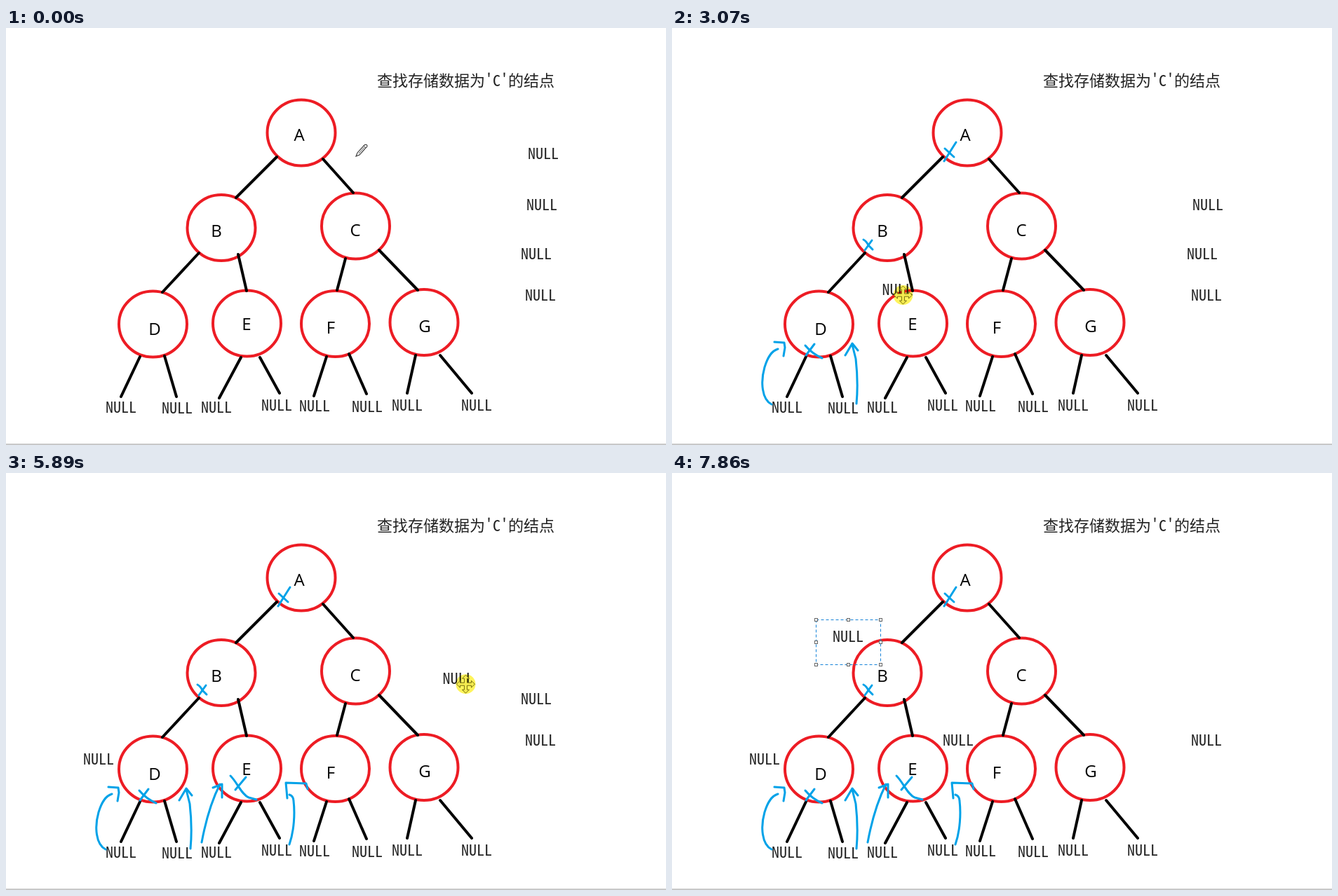
These frames come from a looping animation (941x595 px, 8 s). An HTML page:

```html
<!DOCTYPE html>
<html lang="zh">
<head>
<meta charset="utf-8">
<title>Tree search</title>
<style>
  html, body { margin: 0; width: 100%; height: 100%; overflow: hidden; background: #fff; }
  svg { display: block; width: 941px; height: 595px; }
  .cjk { font: 22px "Noto Sans Mono CJK SC", "Noto Sans Mono CJK JP", "Noto Sans CJK SC", "Noto Sans CJK", monospace; fill: #222; font-weight: 300; }
  .key { font: 24px "Open Sans", "Noto Sans", sans-serif; text-anchor: middle; }
  .node { fill: none; stroke: #ed1c24; stroke-width: 4; }
  .edge { stroke: #000; stroke-width: 4; stroke-linecap: round; }
  .ink { fill: none; stroke: #00a2e8; stroke-width: 3; stroke-linecap: round; stroke-linejoin: round; }
  .box { fill: none; stroke-width: 1; }
  .grip { fill: #fff; stroke: #666; }
</style>
</head>
<body>
<svg id="stage" viewBox="0 0 941 595">
  <rect y="593" width="941" height="2" fill="#c8c8c8"/>
  <text class="cjk" x="529" y="83">查找存储数据为'C'的结点</text>
  <g id="tree"></g>
  <g id="inks"></g>
  <g id="boxes"></g>
  <g id="pencil">
    <path d="M0 0L2-5L12-16Q15-18 16-15Q16-13 14-12L5-2Z" fill="#fff" stroke="#333" stroke-width="1.1"/>
    <path d="M4-4L13-14M11-15L14-12M0 0L2-1" fill="none" stroke="#555"/>
  </g>
  <g id="cursor">
    <circle r="14" fill="#fff45c" style="mix-blend-mode:multiply"/>
    <g id="cross" fill="none" stroke="#77743a"><circle r="4.5"/><path d="M-12 0H-2M2 0H12M0-12V-2M0 2V12"/></g>
    <path id="move" fill="#f5ec50" stroke="#77700f" d="M0-13L5-8H2V-2H8V-5L13 0L8 5V2H2V8H5L0 13L-5 8H-2V2H-8V5L-13 0L-8-5V-2H-2V-8H-5Z"/>
  </g>
</svg>
<script>
const LOOP = 8000;
const $ = id => document.getElementById(id);

function add(parent, tag, attrs, text) {
  const el = document.createElementNS('http://www.w3.org/2000/svg', tag);
  for (const k in attrs) el.setAttribute(k, attrs[k]);
  if (text) el.textContent = text;
  parent.append(el);
  return el;
}
const show = (el, on) => el.setAttribute('visibility', on ? 'visible' : 'hidden');
const place = (el, p) => el.setAttribute('transform', `translate(${p[0]} ${p[1]})`);
const clamp = v => Math.max(0, Math.min(1, v));
const mix = (a, b, k) => a + (b - a) * k;
const label = (x, y) => add($('tree'), 'text', { class: 'cjk', x: x - 22, y: y + 8 }, 'NULL');

// letter, circle centre, letter centre
const nodes = [
  ['A', 421, 149.5, 418, 152], ['B', 307, 285, 300, 289], ['C', 498.5, 282.5, 498, 288],
  ['D', 209.5, 422.5, 212, 429], ['E', 343.5, 421.5, 343, 422],
  ['F', 469.5, 422, 463, 427], ['G', 596, 420, 597, 425]
];
for (const [name, cx, cy, x, y] of nodes) {
  add($('tree'), 'ellipse', { class: 'node', cx, cy, rx: 48.5, ry: 47 });
  add($('tree'), 'text', { class: 'key', x, y: y + 8.5 }, name);
}
add($('tree'), 'path', { class: 'edge', d:
  'M386 184L328 242M452 187L495 235M275 321L223 377M331 323L343 375M484 329L472 374M532 317L587 374' +
  'M191 469L164 526M226 468L243 526M335 470L304 528M362 470L390 521M457 469L439 525M489 465L514 522' +
  'M584 467L572 521M619 467L664 521' });
[[164, 541], [244, 542], [300, 541], [386, 538], [440, 539], [515, 540], [572, 538], [671, 538], [762, 381]]
  .forEach(p => label(...p));

// Pencil steps: start, end, path; a path with "h0.1" is only a resting place
const sessions = [
  [
    [0, 30, 'M499 183h0.1'],
    [260, 350, 'M405 163Q398 174 388 190'], [400, 470, 'M389 172L402 184'],
    [620, 690, 'M273 302Q277 304 280 310L286 316'], [730, 780, 'M285 303L275 317'],
    [820, 850, 'M299 316h0.1'],
    [980, 1060, 'M190 453Q200 465 214 471'], [1100, 1160, 'M203 451L191 467'],
    [1220, 1380, 'M142 537C128 530 126 505 132 484C136 471 141 461 151 458'],
    [1420, 1500, 'M146 448L160 449L161 456L159 468'],
    [1650, 1670, 'M281 519h0.1'],
    [1780, 1920, 'M263 536C265 515 264 490 262 472L257 452'],
    [1980, 2080, 'M247 467L257 450L265 460'],
    [2420, 2420, 'M51 -2h0.1']
  ],
  [
    [3820, 3830, 'M300 266h0.1'],
    [4000, 4100, 'M320 432C330 442 336 459 346 463L357 466'], [4150, 4220, 'M342 434L327 452'],
    [4320, 4450, 'M279 527C284 500 292 470 305 444'],
    [4490, 4570, 'M295 449L308 444L308 463'],
    [4620, 4650, 'M330 480h0.1'],
    [4720, 4880, 'M404 530C411 510 412 485 410 468Q410 461 404 459'],
    [4950, 5040, 'M401 464L399 442L428 443L430 451'],
    [5140, 5140, 'M226 201h0.1']
  ]
].map(list => list.map(([from, to, d]) => {
  const el = add($('inks'), 'path', { class: 'ink', d });
  const rest = d.includes('h0.1');
  const len = el.getTotalLength();
  const at = k => { const p = el.getPointAtLength(len * k); return [p.x, p.y]; };
  return { from, to, el, rest, len, at };
}));

function penAt(list, t) {
  for (let i = 0; i < list.length; i++) {
    const s = list[i], prev = list[i - 1];
    if (t < s.from) {
      const k = (t - prev.to) / (s.from - prev.to), a = prev.at(1), b = s.at(0);
      return [mix(a[0], b[0], k), mix(a[1], b[1], k)];
    }
    if (t <= s.to) return s.at((t - s.from) / (s.to - s.from || 1));
  }
}

function drawPen(t) {
  const list = sessions.find(s => t >= s[0].from && t < s[s.length - 1].to);
  show($('pencil'), list);
  if (list) place($('pencil'), penAt(list, t));
  for (const s of sessions.flat()) {
    const k = clamp((t - s.from) / (s.to - s.from || 1));
    show(s.el, !s.rest && k > 0);
    s.el.setAttribute('stroke-dasharray', `${s.len * k} ${s.len + 9}`);
  }
}

// Mouse tracks: time, x, y
const tracks = [
  [[2590, 430, -12], [2740, 693, 135], [2860, 827, 218], [2920, 774, 187], [3070, 330, 381],
   [3390, 140, 416], [3410, 140, 416], [3610, 236, -14]],
  [[5520, -12, 40], [5680, 708, 225], [5790, 818, 292], [5830, 775, 260], [5890, 656, 301],
   [6310, 419, 389], [6330, 419, 389], [6500, 107, 27], [6520, 95, -15], [6620, 107, -15],
   [6850, 710, 298], [6990, 794, 352], [7050, 802, 362], [7130, 771, 324], [7150, 771, 324],
   [7550, 266, 235], [7690, 266, 235], [7720, 300, 228], [7850, 104, 28]]
];

function mouseAt(t) {
  const track = tracks.find(r => t >= r[0][0] && t < r[r.length - 1][0]);
  if (!track) return null;
  const i = track.findIndex(p => p[0] > t), a = track[i - 1], b = track[i];
  const k = (t - a[0]) / (b[0] - a[0]);
  return [mix(a[1], b[1], k), mix(a[2], b[2], k)];
}

// Each drag: label centre, shift, marquee box, and times
const drags = [
  { text: [766, 179], shift: [-634, 229], box: [693, 135, 134, 83], mark: [2740, 2860], drag: [2920, 3390], held: [3410, 3820] },
  { text: [764, 252], shift: [-356, 129], box: [708, 225, 110, 67], mark: [5680, 5790], drag: [5830, 6310], held: [6330, 6510] },
  { text: [756, 322], shift: [-505, -89], box: [710, 298, 92, 64], mark: [6850, 7050], drag: [7150, 7550], held: [7690, LOOP] }
];
for (const d of drags) {
  const [, , w, h] = d.box;
  d.label = label(...d.text);
  d.frame = add($('boxes'), 'g', {});
  d.rect = add(d.frame, 'rect', { class: 'box', x: .5, y: .5 });
  d.grips = add(d.frame, 'g', {});
  for (const i of [0, .5, 1]) for (const j of [0, .5, 1]) {
    if (i !== .5 || j !== .5) add(d.grips, 'rect', {
      class: 'grip', x: Math.round(w * i) - 1.5, y: Math.round(h * j) - 1.5, width: 4, height: 4 });
  }
}

const within = (t, [a, b]) => t >= a && t < b;

function drawDrag(d, t, mouse) {
  let off = [0, 0];
  if (t >= d.drag[1]) off = d.shift;
  else if (t >= d.drag[0]) {
    const grab = mouseAt(d.drag[0]);
    off = [mouse[0] - grab[0], mouse[1] - grab[1]];
  }
  place(d.label, off);

  const marking = within(t, d.mark);
  const held = within(t, [d.mark[1], d.drag[0]]) || within(t, d.held);
  const [x, y, w, h] = d.box;
  show(d.frame, marking || held);
  show(d.grips, held);
  place(d.frame, [x + off[0], y + off[1]]);
  d.rect.setAttribute('width', marking ? Math.max(0, mouse[0] - x) : w);
  d.rect.setAttribute('height', marking ? Math.max(0, mouse[1] - y) : h);
  d.rect.setAttribute('stroke', marking ? '#222' : '#1683d8');
  d.rect.setAttribute('stroke-dasharray', marking ? '3 3' : '4 3');
}

function draw() {
  const t = performance.now() % LOOP;
  const mouse = mouseAt(t);
  drawPen(t);
  for (const d of drags) drawDrag(d, t, mouse);
  const moving = drags.some(d => within(t, [d.drag[0] - 30, d.held[0] + 40]));
  $('cursor').style.display = mouse ? '' : 'none';
  if (mouse) place($('cursor'), mouse);
  show($('move'), moving);
  show($('cross'), !moving);
  requestAnimationFrame(draw);
}
draw();
</script>
</body>
</html>
```
